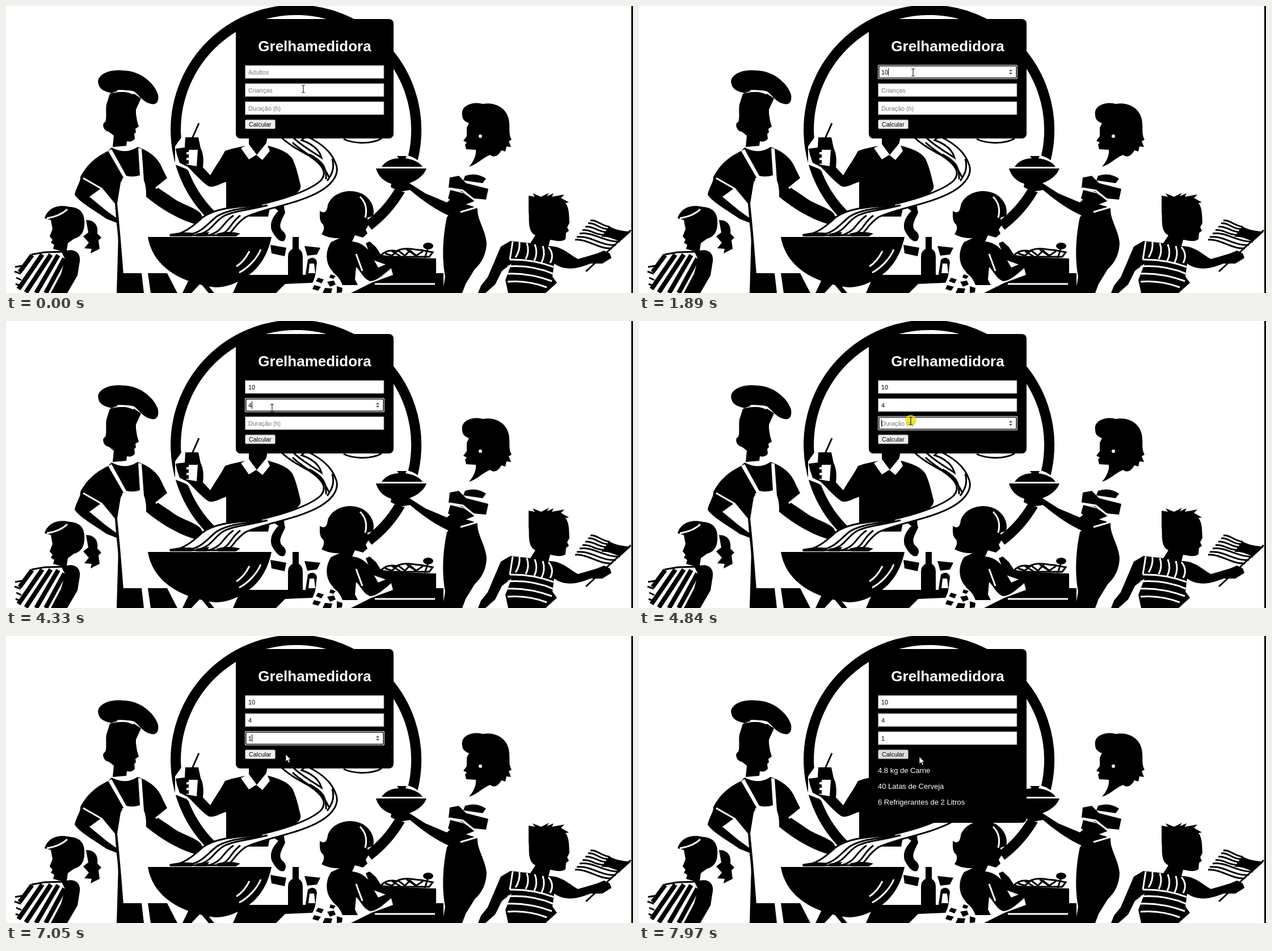
These frames come from a looping animation (1105 px wide and 507 px high, 8 s). An HTML page:

```html
<!DOCTYPE html>
<html lang="pt">
<meta charset="utf-8">
<title>Grelhamedidora</title>
<style>
html, body { margin: 0; height: 100%; overflow: hidden; background: #fff }
svg { display: block; width: 1105px; height: 507px; font-family: "Liberation Sans", Arial, sans-serif }
.w { fill: #fff }
.l { fill: none; stroke: #000; stroke-width: 3 }
.k { fill: none; stroke: #fff; stroke-width: 3 }
.o { fill: #fff; stroke: #000; stroke-width: 3 }
.small { font-size: 10.83px }
.result { font-size: 13px; fill: #fff }
</style>
<svg viewBox="0 0 1105 507">
<rect x="1102" width="3" height="507"/>
<path class="l" style="stroke-width:18" d="M371 378A212 212 0 1 1 639 388"/>

<!-- man with the cup -->
<g>
<path class="w" d="M298 248L312 228H346L352 275L366 290L350 318L318 288L298 280Z"/>
<path d="M428 230H461L458 246C480 251 497 258 505 270C512 285 515 300 519 316C521 326 511 333 500 336C490 340 488 350 492 365C485 380 480 388 486 396C494 402 495 408 490 415C482 418 474 408 468 396C464 382 472 370 480 362L466 352L462 372H388V311C379 312 366 323 356 318C342 308 329 292 320 284L306 277L301 262L299 252L315 250L316 232H339L343 251C349 262 348 277 347 285L360 299C370 282 380 268 386 256C400 251 416 248 428 246Z"/>
<path class="w" d="M318 254H338L336 283L318 280ZM414 251L428 244L442 263L459 242L465 256L452 272L441 263L428 271Z"/>
<path class="l" d="M328 234L340 207"/>
<path d="M302 252L322 253V258L304 259ZM304 263L322 262V268L307 270ZM309 273L322 272V279L313 278Z"/>
</g>

<!-- cook -->
<g>
<path d="M163 138C158 124 178 111 206 114C239 114 263 139 268 157C270 170 264 175 256 173C243 171 237 160 226 151C211 147 197 149 186 154C175 151 165 148 163 138Z"/>
<path d="M183 155C197 151 213 151 224 154L238 163L229 183L229 190L231 203L234 213L228 217L229 223L226 226L227 234C224 240 217 240 213 239L212 247L188 249L190 229L181 222C172 221 169 209 173 206C179 205 175 184 177 174Z"/>
<path class="k" d="M196 150Q212 149 225 155" stroke-width="2"/>
<path d="M186 250C204 259 218 258 232 249C255 257 269 270 276 288L284 304L266 320L290 336C307 350 330 354 343 366L351 382L341 388L326 383C307 377 275 361 246 336L240 350V304H205V354L208 476V507H195L198 405L195 383L177 376C158 362 128 346 121 333C124 319 132 310 131 302C142 282 154 269 180 256Z"/>
<path class="w" d="M180 256L186 253L212 300Q224 303 236 299L233 251L239 252L243 308C247 318 248 332 246 342C255 366 274 387 278 408H250L264 474H207C204 435 201 396 196 349L202 312L207 303Z"/>
<path class="l" d="M190 352C198 375 201 430 202 480"/>
<path class="w" d="M147 337L169 321L192 349L194 374L176 361Z"/>
<path class="k" d="M136 304L169 323M284 306L264 322" stroke-width="2"/>
<path d="M205 472H239L243 507H197ZM250 472H284L302 507H255Z"/>
</g>

<!-- grill and smoke -->
<path d="M250 408H468C461 442 444 466 421 480C402 492 386 497 369 497C312 490 259 463 250 408ZM322 484L341 492L327 507H311ZM343 490H353L367 507H357Z"/>
<path class="k" d="M449 430C442 447 426 463 411 471M429 433C423 445 416 454 406 460"/>
<path class="o" d="M290 405C311 404 329 390 347 373C372 355 408 356 446 351C486 342 534 327 554 309C568 294 557 280 535 265C515 254 497 244 483 230H504C516 244 541 258 556 268C552 253 538 243 521 237L529 230C558 243 573 258 580 276C590 295 576 314 554 327C515 350 455 357 422 373C402 387 401 398 390 405Z"/>
<path class="l" d="M322 404C345 400 354 386 371 372C397 356 427 359 451 351M337 404C364 398 364 383 384 371C401 362 430 360 461 352M357 405C384 397 380 384 401 370M375 405C397 397 394 384 413 370M505 241C528 264 554 268 569 302M535 262C558 275 565 284 564 306M575 270C580 288 573 299 566 309M595 235C614 244 645 244 662 234"/>
<path d="M288 403Q310 398 332 401L327 407H289ZM335 402L358 399L354 407H335ZM371 402Q392 396 413 402L405 407H374Z"/>

<!-- table -->
<path d="M505 408H516V429Q523 433 523 443V481H497V443Q497 433 505 429ZM466 422L494 427L491 442L468 437ZM526 424L554 427L548 439L531 441ZM532 448Q541 441 547 449L554 480H527ZM470 475H570L565 488L492 491L476 507H400L414 475Z"/>
<path class="w" d="M535 455H543L545 472H533Z"/>

<!-- girl at the table -->
<path d="M553 362C562 368 566 362 567 352C574 331 602 321 626 331C643 339 651 357 647 371L637 374L639 387L634 395L637 402L629 409L615 405L610 416C630 418 643 432 648 448L656 462L680 452L685 458C670 470 654 487 641 486C629 481 625 468 617 461L615 483L620 493H588L575 468C563 455 562 433 573 417L588 410C574 411 563 407 556 403C561 396 561 391 559 386C552 381 553 371 553 362Z"/>
<path class="k" d="M624 337C634 347 637 359 633 374M617 438L628 468"/>
<path class="w" d="M550 445C544 464 550 475 537 494L534 507H605C590 498 595 486 580 474Z"/>
<path d="M550 480l10 3-4 7-10-4ZM566 487l12-2 3 7-10 4ZM543 493l12 3-5 7-10-3ZM562 498l13 1-2 8h-15ZM583 495l10 3-1 8-9 1ZM572 474l9 3-4 5-7-2Z"/>

<!-- food -->
<path d="M641 416L652 426L663 443L758 446V472H771V507H608L644 489L682 475L678 460L645 448L634 419Z"/>
<path class="o" d="M660 441C670 431 680 431 688 433C704 425 719 431 731 431L752 435L746 443H675Z"/>
<path class="l" d="M668 437l12 4 11-9 12 9 9-9 11 9 12-8M680 433l15 9M706 430l19 13"/>
<ellipse cx="744" cy="424" rx="9" ry="6"/><path class="l" d="M744 427L738 445"/>
<path class="k" d="M650 491H756"/>

<!-- dish and woman -->
<g>
<path class="w" d="M648 287L662 280Q675 263 697 262Q724 265 736 284L744 287L731 310L706 330L672 320Z"/>
<path d="M662 284C670 272 684 269 692 269L689 265H706L704 269C719 271 730 277 734 284ZM652 287H741C736 301 722 309 711 313L739 331L777 347L787 338L797 349L802 367L785 372C757 361 731 341 712 325L694 328L678 320L679 314C664 309 656 300 652 287Z"/>
<path d="M804 193C801 176 822 168 840 173C862 169 882 180 886 200C889 217 885 225 891 236L886 239L890 249L882 248L880 257L873 255C866 268 858 267 853 263C837 270 830 280 816 284C824 275 829 264 828 254L811 253L809 245L812 241L806 238L812 230L812 215L816 207C810 205 804 201 804 193Z"/>
<circle class="w" cx="836" cy="230" r="3"/>
<path d="M809 300Q829 293 846 305L840 313L806 308ZM782 303L798 300L811 313L850 323L846 342L825 340L803 328L780 321ZM783 325L807 331L827 344L802 354L779 340ZM802 348L823 354L831 358C830 377 845 395 847 419C846 438 840 452 826 465L810 491L804 507H769L774 478C767 441 771 401 777 373L788 361Z"/>
<path class="k" d="M781 322L805 326L827 344M801 364L828 356" stroke-width="2"/>
</g>

<!-- boy with flag -->
<g>
<path d="M921 335L932 337L928 331L943 337L957 330L953 336L965 331L962 337L984 333L978 339L992 347L986 348C993 357 992 370 993 383L989 391L992 397L987 401L986 412C979 418 966 414 959 413L956 424C981 424 994 440 1008 447L1042 437L1054 432L1064 437L1067 445L1051 455L1030 455C1001 467 982 466 966 455L963 478L971 489L951 507H885L880 484L891 455L874 468L862 492L845 507H832L837 494L849 479L872 425L889 415L924 419L933 405C918 398 923 375 921 364Z"/>
<path class="k" d="M893 416L888 448M905 417Q906 432 898 444M918 419Q923 434 916 447M932 421Q938 437 931 450M946 424Q951 439 944 453M888 448Q927 447 965 461M884 460Q927 457 964 473M881 473Q921 471 962 486M884 487Q919 484 953 497M956 426Q967 439 959 454"/>
<path class="l" d="M1101 396L1022 469"/>
<path d="M1063 389C1077 397 1088 397 1101 399L1082 416C1071 412 1062 407 1049 408Z"/>
<path class="l" d="M1030 379C1041 377 1050 389 1064 390M1026 384C1038 382 1046 394 1060 394M1021 390C1034 388 1044 399 1056 399M1016 396C1030 394 1040 405 1052 404M1011 402C1033 398 1056 418 1082 416M1006 408C1030 405 1050 425 1075 422M1003 413C1025 411 1045 430 1068 428"/>
</g>

<!-- girl on the left -->
<g>
<path d="M68 375C74 355 94 350 113 355C133 356 140 369 138 388C137 402 129 409 120 411L109 419L107 432C124 428 132 439 130 451L126 476L108 507H79L97 473L104 447L97 433L83 429L85 422L79 418L82 413L77 407L82 394L79 378Z"/>
<path d="M141 378C157 378 163 389 161 402L168 409L163 414L165 429L149 437L151 429L138 428L146 418L136 407L145 400Z"/>
<path class="k" d="M72 375Q96 371 108 359" stroke-width="2"/>
<path class="l" style="stroke-width:8" d="M46 440L24 470M64 439L22 500M79 439L35 506M92 440L53 507M103 446L70 507M112 458L87 507"/>
<path class="l" d="M16 461l12-2M15 469l11 4M18 480l9 4M17 491l10 4M45 439L68 435L103 434"/>
</g>

<!-- form -->
<rect id="panel" x="405" y="23" width="278" rx="8"/>
<text x="544" y="80" text-anchor="middle" font-size="26" font-weight="bold" fill="#fff">Grelhamedidora</text>
<g id="fields"></g>
<rect id="button" x="421.5" y="201" width="53" height="16" rx="2" stroke="#767676" stroke-width=".8"/>
<text class="small" x="428" y="213">Calcular</text>
<g id="results" class="result">
<text x="421" y="242">4.8 kg de Carne</text>
<text x="421" y="270">40 Latas de Cerveja</text>
<text x="421" y="298">6 Refrigerantes de 2 Litros</text>
</g>
<circle id="halo" r="10" fill="#e8dc20" opacity=".8"/>
<path id="beam" d="M-3-6H-1L0-5L1-6H3M0-5V6M-3 7H-1L0 6L1 7H3" fill="none" stroke="#222" stroke-width="1.2"/>
<path id="arrow" d="M0 0V13L3 10.3L5.2 15L7.4 14L5.3 9.5H9Z" fill="#fff" stroke="#000" stroke-width=".8"/>
</svg>
<script>
const el = id => document.getElementById(id);
const show = (node, on) => node.setAttribute("visibility", on ? "visible" : "hidden");

const hints = ["Adultos", "Crianças", "Duração (h)"];
// Each entry: field, time, text
const typing = [[0, 1360, "1"], [0, 1430, "10"], [1, 3870, "4"], [2, 6430, "1"]];
const focusTimes = [680, 2440, 4760, 7460];
const caretTimes = [810, 1360, 1430, 2440, 3870, 4760, 6510];
const clicks = [[680, 810], [2440, 2760], [4760, 4960], [6430, 6510], [7460, 7610]];
// Each move: first step, last step, number of steps, end x, end y
const moves = [
  [70, 540, 8, 483, 117], [2020, 2370, 6, 467, 149], [4330, 4560, 4, 479, 176],
  [5340, 5720, 6, 752, 177], [5780, 6100, 6, 655, 180], [6160, 6160, 1, 649, 175],
  [6310, 6380, 2, 655, 178], [6710, 7050, 6, 493, 209], [7110, 7460, 6, 463, 213],
  [7890, 7970, 2, 494, 213]
];

const fields = hints.map((hint, i) => {
  const g = document.createElementNS("http://www.w3.org/2000/svg", "g");
  g.setAttribute("transform", `translate(421 ${105 + i * 32})`);
  g.innerHTML = `<rect x=".5" width="244.5" height="23" fill="#fff" stroke="#767676" stroke-width=".8"/>
    <g><rect y="-1" width="246" height="25" rx="2.5" fill="#fff"/>
    <rect x="1.7" y=".7" width="242.6" height="21.6" rx="1.5" fill="#fff" stroke="#000" stroke-width="1.6"/></g>
    <path d="M231 10.3L234 7L237 10.3ZM231 12.7L234 16L237 12.7Z" fill="#444"/>
    <text class="small" x="6" y="15.5"></text>
    <rect y="5" width="1" height="13"/>`;
  el("fields").append(g);
  const [, ring, spin, text, caret] = g.children;
  return { ring, spin, text, caret };
});

function pointer(t) {
  let x = 524, y = 146;
  for (const [start, end, n, toX, toY] of moves) {
    if (t < start) break;
    const step = n > 1 ? Math.floor((t - start) / (end - start) * (n - 1) + 1e-6) + 1 : 1;
    const p = Math.min(1, step / n), e = p * p * (3 - 2 * p);
    x += (toX - x) * e;
    y += (toY - y) * e;
  }
  return [x, y];
}

function draw(t) {
  const [x, y] = pointer(t);
  const focus = focusTimes.filter(at => at <= t).length - 1;
  const since = caretTimes.filter(at => at <= t).pop() || 0;
  const blink = Math.floor((t - since) / 580) % 2 === 0;
  const row = Math.floor((y - 105) / 32);
  const inside = x > 421 && x < 667 && row >= 0 && row < 3 && (y - 105) % 32 < 23;

  fields.forEach((f, i) => {
    const typed = typing.filter(k => k[0] === i && k[1] <= t).pop();
    const value = typed ? typed[2] : "";
    f.text.textContent = value || hints[i];
    f.text.setAttribute("fill", value ? "#000" : "#757575");
    f.caret.setAttribute("x", 6 + value.length * 6.1);
    show(f.ring, focus === i);
    show(f.spin, focus === i || (t >= 500 && inside && row === i));
    show(f.caret, focus === i && blink);
  });

  const done = t >= 7610;
  el("panel").setAttribute("height", done ? 307 : 211);
  show(el("results"), done);
  const overButton = x < 475 && y > 200;
  el("button").setAttribute("fill", done || overButton ? "#dedede" : "#efefef");

  const arrow = !inside || x > 651;
  show(el("halo"), clicks.some(([down, up]) => t >= down && t < up));
  show(el("beam"), !arrow);
  show(el("arrow"), arrow);
  for (const id of ["halo", "beam", "arrow"])
    el(id).setAttribute("transform", `translate(${x.toFixed(1)} ${y.toFixed(1)})`);
}

function tick(now) {
  draw(now % 8000);
  requestAnimationFrame(tick);
}
draw(0);
requestAnimationFrame(tick);
</script>
</html>
```
